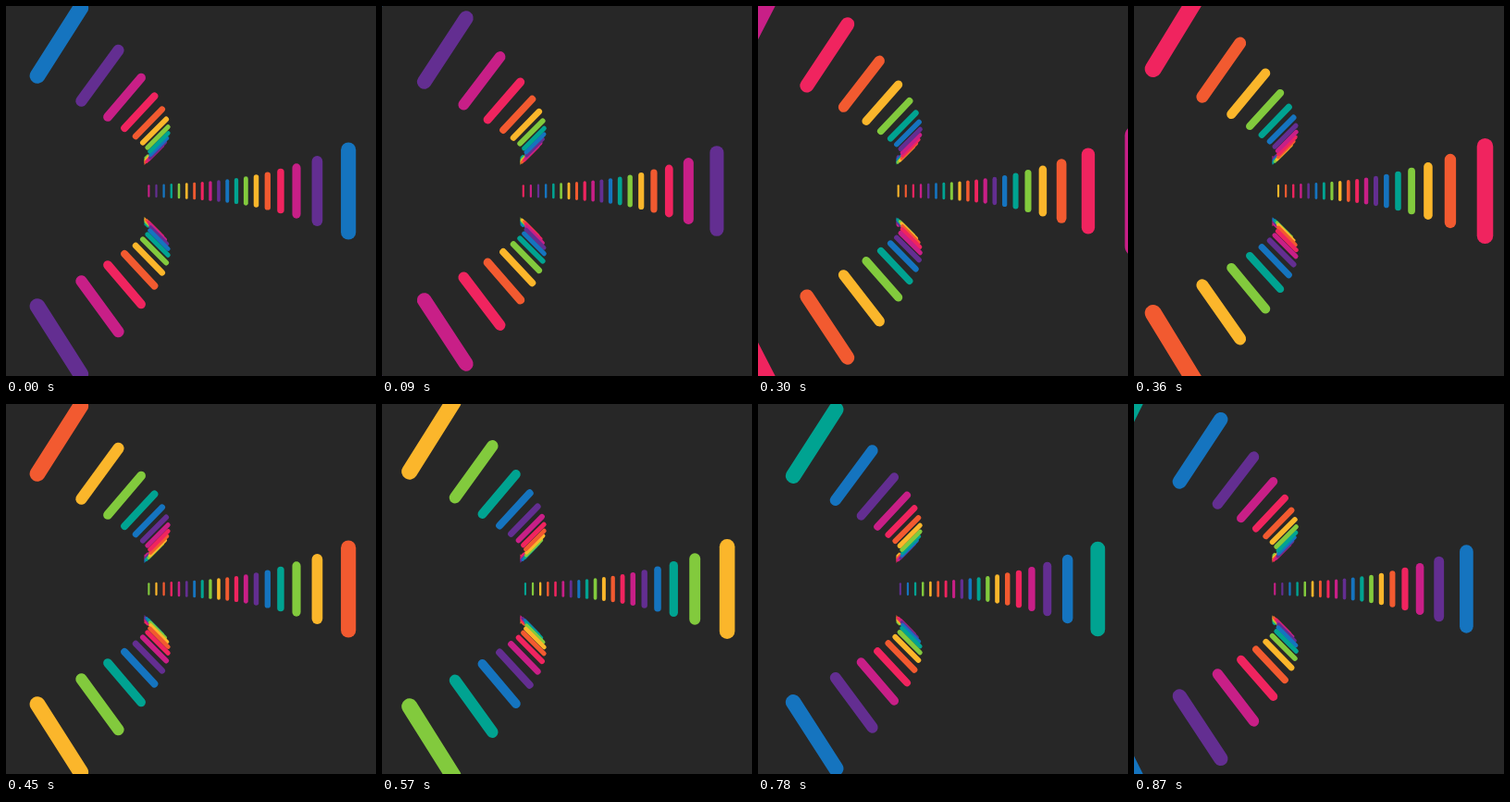
These frames come from a looping animation (400x400 px, 900 ms). An HTML page:

```html
<!DOCTYPE html>
<html lang="en">
<head>
<meta charset="utf-8">
<title>Curved bar tunnel</title>
<style>
  html, body { margin: 0; width: 100%; height: 100%; overflow: hidden; background: #272727; }
  svg { display: block; width: 100%; height: 100%; }
</style>
</head>
<body>
<svg id="stage" viewBox="0 0 400 400" stroke-linecap="round">
  <clipPath id="far" clipPathUnits="userSpaceOnUse">
    <rect x="149.5" y="0" width="251" height="400"/>
  </clipPath>
  <rect width="400" height="400" fill="#272727"/>
</svg>
<script>
const COLORS = ['#1574bf', '#632e91', '#c81f87', '#f0245f',
                '#f25a30', '#fbb62b', '#82ca3d', '#00a391'];
const LOOP = 900, TICK = 30, MID = 200, BARS = 21;
const NEAREST = -1.2, CLIP_FROM = 7;

// outer wall: camera on a ring of radius 1, yawed into the bend
const FOCAL = 327, YAW = 0.3, WALL = 1.0325, STEP = 0.0451, START = -0.1717;

const stage = document.getElementById('stage');
const makeLine = () => stage.appendChild(
  document.createElementNS('http://www.w3.org/2000/svg', 'line'));
const rows = Array.from({ length: BARS }, () => [makeLine(), makeLine(), makeLine()]);

function setLine(line, x1, y1, x2, y2, width, color, clipped) {
  const attrs = { x1, y1, x2, y2, 'stroke-width': width, stroke: color,
                  'clip-path': clipped ? 'url(#far)' : 'none' };
  for (const name in attrs) line.setAttribute(name, attrs[name]);
}

// k is the distance along the tunnel, in bar spacings
function outerBar(k) {
  const a = START + STEP * k;
  const depth = WALL * Math.sin(a) + Math.sin(YAW);
  return {
    x: MID + FOCAL * (WALL * Math.cos(a) - Math.cos(YAW)) / depth,
    half: 5.3 / depth,
    width: 1.93 / depth
  };
}

function innerBar(k) {
  const u = k + 3.11, v = k + 3.58;
  const near = Math.max(0, 0.6 - k);   // bars lean more beside the camera
  const bend = 1 + k * k / 4000;       // depth grows slower round the bend
  const tipY = 625 / u * bend - 5 * near, rootY = 446 / v * bend;
  const tipX = 111.8 - 664 / u - 7 * u + 7 * near;
  const rootX = k < 5 ? 95.5 - 867 / v - 5.4 * v : tipX - (tipY - rootY);
  return { tipX: MID + tipX, tipY, rootX: MID + rootX, rootY,
           width: 16.8 * (3.1 / (k + 3.1)) ** 1.1 };
}

function render(time) {
  const t = Math.floor((time % LOOP) / TICK) * TICK;
  const shift = t / LOOP * COLORS.length;
  const first = Math.ceil(shift + NEAREST);
  rows.forEach(([right, upper, lower], i) => {
    const n = first + BARS - 1 - i;   // farthest first
    const k = n - shift;
    const clipped = k > CLIP_FROM;
    const color = COLORS[(n + 8) % 8], next = COLORS[(n + 9) % 8];
    const o = outerBar(k), b = innerBar(k);
    setLine(right, o.x, MID - o.half, o.x, MID + o.half, o.width, color, clipped);
    setLine(upper, b.rootX, MID - b.rootY, b.tipX, MID - b.tipY, b.width, color, clipped);
    setLine(lower, b.rootX, MID + b.rootY, b.tipX, MID + b.tipY, b.width, next, clipped);
  });
}

const begin = performance.now();
function frame() {
  render(performance.now() - begin);
  requestAnimationFrame(frame);
}
frame();
</script>
</body>
</html>
```
